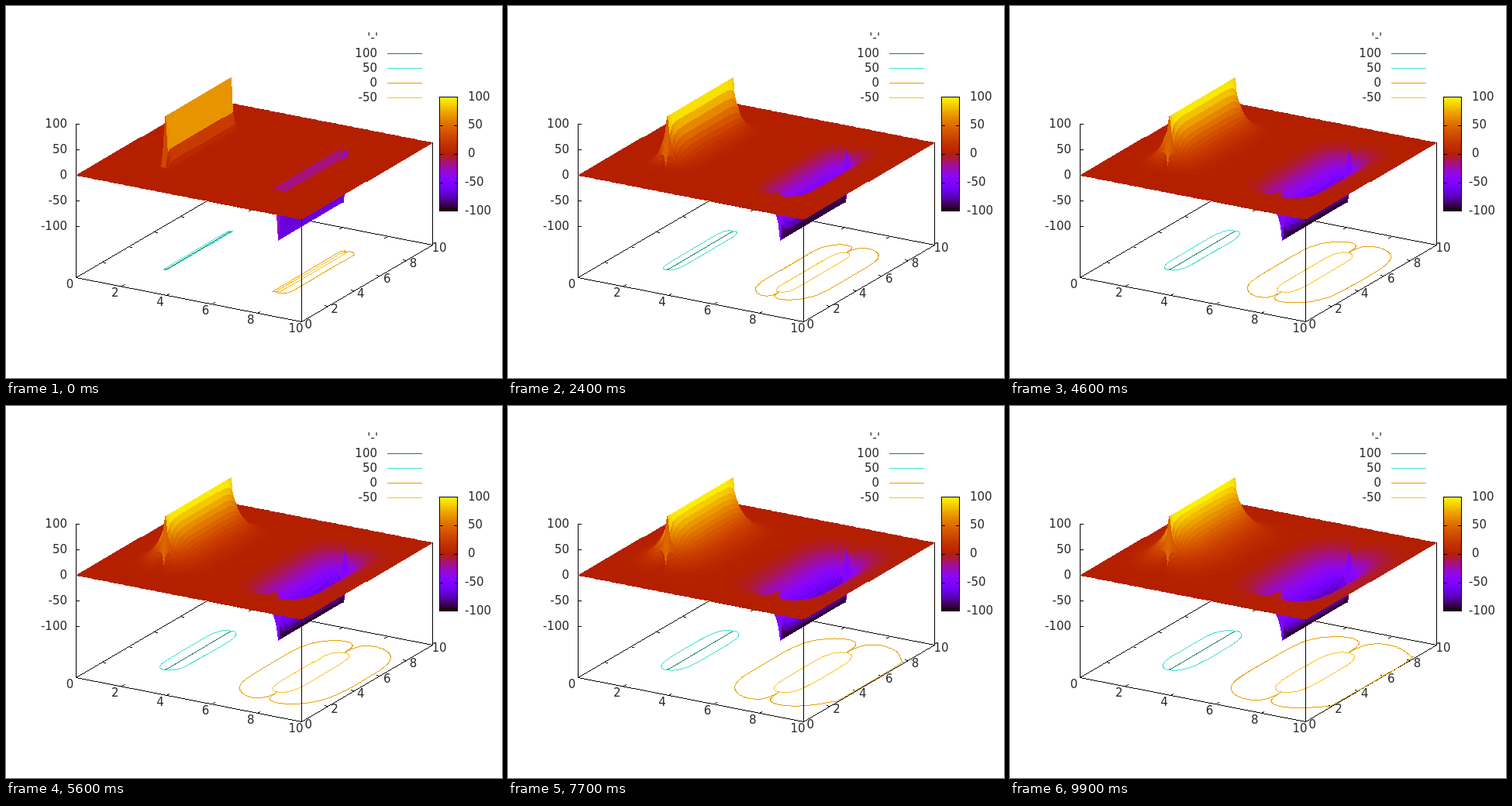
An HTML page with a canvas that plays this animation: 640 px wide and 480 px high, repeating every 10 s.

```html
<!DOCTYPE html>
<html lang="en">
<head>
<meta charset="utf-8">
<title>Relaxing potential between two plates</title>
<style>
  html, body { margin: 0; width: 100%; height: 100%; overflow: hidden; background: #fff; }
  canvas { display: block; }
</style>
</head>
<body>
<canvas id="stage" width="640" height="480"></canvas>
<script>
const W = 640, H = 480, N = 100, STEPS = 100, STEP_MS = 100;
const LEFT = 25, RIGHT = 75;
const ctx = document.getElementById('stage').getContext('2d');
const image = ctx.createImageData(W, H);
const px = new Uint32Array(image.data.buffer);

const rgb = (r, g, b) => (255 << 24 | b << 16 | g << 8 | r) >>> 0;
const BLACK = rgb(0, 0, 0), WHITE = rgb(255, 255, 255);
const LEVELS = [
  { label: '100', at: 99.9, color: rgb(20, 128, 88) },
  { label: '50', at: 50, color: rgb(64, 224, 208) },
  { label: '0', at: -0.85, color: rgb(230, 159, 0) },
  { label: '-50', at: -50, color: rgb(255, 192, 32) }
];

// Black, violet, red, yellow palette for values from -100 to 100
function heat(v) {
  const g = Math.min(1, Math.max(0, (v + 100) / 200));
  return rgb(255 * Math.sqrt(g), 255 * g ** 3, 255 * Math.max(0, Math.sin(2 * Math.PI * g)));
}

const project = (x, y, z = -200) =>
  [90 + 29.1 * x + 16.9 * y, 350 + 5.7 * x - 9.9 * y - 0.66 * (z + 200)];

// Gauss-Seidel sweeps; the two plate columns stay fixed, the far x side is insulated
const at = (i, j) => i * (N + 1) + j;
function solve() {
  const u = new Float32Array((N + 1) ** 2), states = [];
  for (let j = 25; j <= 75; j++) {
    u[at(LEFT, j)] = 100;
    u[at(RIGHT, j)] = -100;
  }
  for (let n = 0; n < STEPS; n++) {
    for (let i = 1; i <= N; i++) {
      if (i === LEFT || i === RIGHT) continue;
      const next = i < N ? i + 1 : i - 1;
      for (let j = 1; j < N; j++) {
        u[at(i, j)] = (u[at(i - 1, j)] + u[at(next, j)] + u[at(i, j - 1)] + u[at(i, j + 1)]) / 4;
      }
    }
    states.push(u.slice().fill(0, at(N, 0)));
  }
  return states;
}

function line([x0, y0], [x1, y1], color = BLACK) {
  x0 = Math.round(x0); y0 = Math.round(y0);
  x1 = Math.round(x1); y1 = Math.round(y1);
  const n = Math.max(Math.abs(x1 - x0), Math.abs(y1 - y0), 1);
  for (let k = 0; k <= n; k++) {
    px[Math.round(y0 + (y1 - y0) * k / n) * W + Math.round(x0 + (x1 - x0) * k / n)] = color;
  }
}

function fill(points, color) {
  const p = points.map(([x, y]) => [Math.round(x), Math.round(y)]);
  const ys = p.map(q => q[1]);
  const bottom = Math.max(...ys);
  for (let y = Math.min(...ys); y <= bottom; y++) {
    let lo = W, hi = 0;
    p.forEach(([ax, ay], k) => {
      const [bx, by] = p[(k + 1) % p.length];
      if (y < Math.min(ay, by) || y > Math.max(ay, by)) return;
      const x = ay === by ? ax : ax + (bx - ax) * (y - ay) / (by - ay);
      lo = Math.min(lo, x);
      hi = Math.max(hi, x);
    });
    px.fill(color, y * W + Math.round(lo), y * W + Math.round(hi) + 1);
  }
}

function contour(u, level, color) {
  const triangle = nodes => {
    const cuts = [];
    nodes.forEach(([i, j], k) => {
      const [m, n] = nodes[(k + 1) % 3];
      const a = u[at(i, j)], b = u[at(m, n)];
      if ((a < level) === (b < level)) return;
      const f = (level - a) / (b - a);
      cuts.push(project((i + (m - i) * f) / 10, (j + (n - j) * f) / 10));
    });
    if (cuts.length) line(cuts[0], cuts[1], color);
  };
  for (let i = 0; i < N; i++) {
    for (let j = 0; j < N; j++) {
      triangle([[i, j], [i + 1, j], [i + 1, j + 1]]);
      triangle([[i, j], [i + 1, j + 1], [i, j + 1]]);
    }
  }
}

function surface(u) {
  for (let j = N - 1; j >= 0; j--) {
    for (let i = 0; i < N; i++) {
      const nodes = [[i, j], [i + 1, j], [i + 1, j + 1], [i, j + 1]];
      let sum = 0;
      const corners = nodes.map(([m, n]) => {
        const v = u[at(m, n)];
        sum += v;
        return project(m / 10, n / 10, v);
      });
      fill(corners, heat(sum / 4));
    }
  }
}

function tick([x, y], dx, dy) {
  line([x, y], [x + dx, y + dy]);
}

function frameLines() {
  const base = [[0, 0], [10, 0], [10, 10], [0, 10]].map(([x, y]) => project(x, y));
  base.forEach((p, k) => line(p, base[(k + 1) % 4]));
  for (let v = 2; v < 10; v += 2) {
    tick(project(v, 0), 4, -2);
    tick(project(v, 10), -4, 2);
    tick(project(0, v), 4, 1);
    tick(project(10, v), -4, -1);
  }
  line(project(0, 0), project(0, 0, 100));
  for (let z = -100; z <= 100; z += 50) tick(project(0, 0, z), 4, 0);
}

function colorBar() {
  for (let y = 117; y <= 264; y++) line([559, y], [582, y], heat(100 - (y - 117) / 147 * 200));
  const box = [[559, 117], [582, 117], [582, 264], [559, 264]];
  box.forEach((p, k) => line(p, box[(k + 1) % 4]));
  for (let k = 1; k < 4; k++) {
    const y = 117 + 37 * k;
    tick([559, y], 4, 0);
    tick([582, y], -4, 0);
  }
}

function labels() {
  ctx.fillStyle = '#2a2a2a';
  ctx.font = '15px "DejaVu Sans", sans-serif';
  const text = (s, x, y, align) => {
    ctx.textAlign = align;
    ctx.fillText(s, x, y);
  };
  for (let k = 0; k < 5; k++) {
    const v = 100 - 50 * k;
    text(v, 79, 157 + 33 * k, 'right');
    text(v, v < 0 ? 592 : 596, 121.5 + 36.8 * k, 'left');
  }
  for (let v = 0; v <= 10; v += 2) {
    text(v, 82.5 + 29.15 * v, 364 + 5.7 * v, 'center');
    text(v, v < 10 ? 385.5 + 16.9 * v : 549.5, 416 - 9.9 * v, 'left');
  }
  text("'-'", 480, 46, 'right');
  LEVELS.forEach((l, k) => text(l.label, 479, 66 + 19 * k, 'right'));
}

function draw(u) {
  px.fill(WHITE);
  frameLines();
  LEVELS.forEach((l, k) => {
    contour(u, l.at, l.color);
    line([492, 61 + 19 * k], [536, 61 + 19 * k], l.color);
  });
  surface(u);
  line(project(10, 0), project(10, 0, 0));
  line(project(10, 10), project(10, 10, 0));
  colorBar();
  ctx.putImageData(image, 0, 0);
  labels();
}

const states = solve();
const start = performance.now();
let shown = -1;
function play() {
  const k = Math.floor((performance.now() - start) / STEP_MS) % STEPS;
  if (k !== shown) draw(states[shown = k]);
  requestAnimationFrame(play);
}
play();
</script>
</body>
</html>
```
